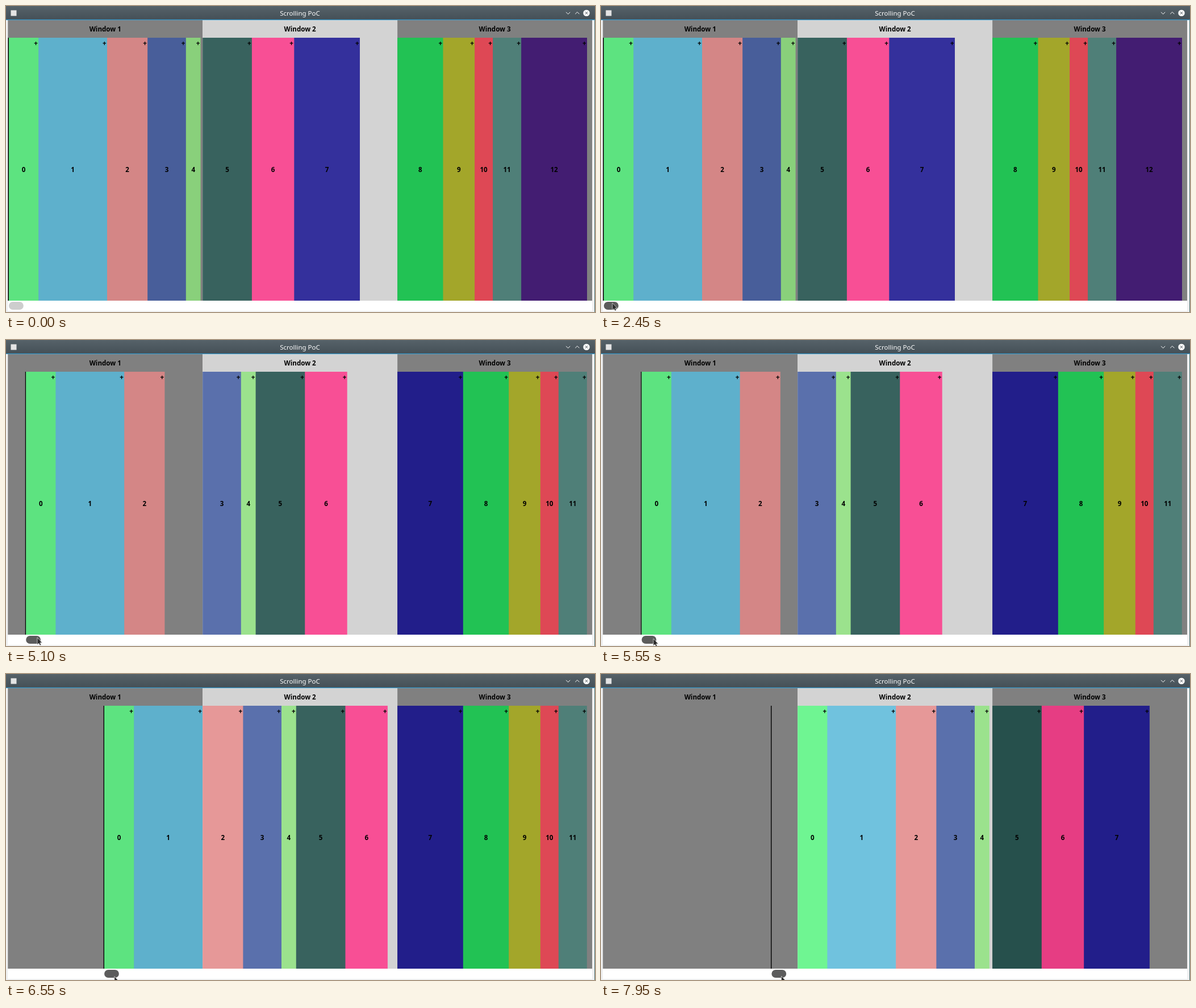
Write an HTML page that moves like this. It is 1037 px wide and 540 px high and loops after 8 s.

```html
<!DOCTYPE html>
<html lang="en">
<head>
<meta charset="utf-8">
<title>Scrolling PoC</title>
<style>
  html, body { margin: 0; width: 100%; height: 100%; overflow: hidden; background: #eff0f1; }
  svg { display: block; }
  text { font: bold 11.6px "Noto Sans", "Open Sans", sans-serif; text-anchor: middle; }
  .title { font-weight: 400; font-size: 11.5px; fill: #fcfcfc; }
  .line { fill: none; stroke: #fcfcfc; stroke-width: 1; }
</style>
</head>
<body>
<svg width="1037" height="540" viewBox="0 0 1037 540">
  <defs>
    <linearGradient id="bar" x2="0" y2="1">
      <stop offset="0" stop-color="#566269"/>
      <stop offset="1" stop-color="#444f56"/>
    </linearGradient>
  </defs>

  <rect width="1037" height="540" fill="#eff0f1"/>
  <rect x="1036" y="25" width="1" height="515" fill="#4a6e70"/>
  <rect width="1037" height="25" fill="url(#bar)"/>
  <rect y="23.8" width="1037" height="1.2" fill="#3b9fd2"/>
  <rect x="8.5" y="7.5" width="10" height="10" fill="#e4e4e4"/>
  <text class="title" x="517.5" y="17">Scrolling PoC</text>
  <path class="line" d="M986 10.8l3.6 3.6 3.6-3.6M1002.2 14.2l3.6-3.6 3.6 3.6"/>
  <circle cx="1022" cy="12.4" r="5.7" fill="#fcfcfc"/>
  <path d="M1019.8 10.2l4.4 4.4m0-4.4l-4.4 4.4" stroke="#475057"/>

  <g id="windows"></g>
  <rect x="3.3" y="520" width="1028.7" height="18" fill="#fff"/>
  <rect id="edge" y="56" width="1.4" height="464"/>
  <g id="columns"></g>
  <rect id="thumb" y="522" width="25.8" height="14" rx="7"/>
  <path id="cursor" d="M0 0V12.6L2.8 10.2 4.8 14 6.8 13 5 9.2H8.6Z" fill="#2b2b2b" stroke="#e8e8e8" stroke-width=".7"/>
</svg>
<script>
const LOOP = 8000, STEP = 50, TOP = 56, HEIGHT = 464;
const EDGES = [3.3, 346.2, 689.1, 1032];
const COLUMNS = [
  [52.2, '#5de380'], [120.8, '#5eb0cc'], [71.2, '#d48686'], [67.6, '#485e9a'],
  [25.8, '#89d07b'], [86.7, '#26504c'], [74.4, '#e63d83'], [115.7, '#221e8a'],
  [80.4, '#22c254'], [55.6, '#a3a62a'], [32, '#de4855'], [50, '#4f7f78'], [115.9, '#431d72']
];

// Each path is a list of [time, value, ...].
const SCROLL = [
  [2450, 5], [3000, 14.2], [4500, 14.2], [5100, 35.2], [5350, 56.3], [5950, 102.2],
  [6200, 125.3], [6950, 219.4], [7050, 223.3], [7900, 294.3], [7950, 300.4]
];
const POINTER = [
  [950, 128, 545], [1000, 125, 532], [1200, 95, 505], [1350, 68, 499], [1550, 34, 510],
  [1700, 17.5, 523], [1750, 20, 524], [2450, 20, 524], [3000, 28, 523.2], [4480, 28, 523.2],
  [5100, 55, 525], [5350, 76, 526], [5950, 124.5, 529], [6200, 147, 530.5],
  [6950, 234.2, 536], [7050, 238.5, 536], [7950, 317.5, 533]
];

const $ = id => document.getElementById(id);

function add(parent, tag, attrs, text = '') {
  const node = document.createElementNS('http://www.w3.org/2000/svg', tag);
  for (const name in attrs) node.setAttribute(name, attrs[name]);
  node.textContent = text;
  return parent.appendChild(node);
}

// Monotone cubic interpolation: smooth, without overshoot.
function follow(path, t, k = 1) {
  const last = path.length - 1;
  if (t <= path[0][0]) return path[0][k];
  if (t >= path[last][0]) return path[last][k];
  const secant = i => (path[i + 1][k] - path[i][k]) / (path[i + 1][0] - path[i][0]);
  const slope = i => {
    if (i === 0) return 0;
    if (i === last) return secant(i - 1);
    const a = secant(i - 1), b = secant(i);
    return a * b > 0 ? 2 * a * b / (a + b) : 0;
  };
  const i = path.findIndex(p => p[0] > t) - 1;
  const [p, q] = [path[i], path[i + 1]];
  const span = q[0] - p[0], u = (t - p[0]) / span, v = 1 - u;
  return v * v * (1 + 2 * u) * p[k] + u * u * (1 + 2 * v) * q[k]
    + span * u * v * (v * slope(i) - u * slope(i + 1));
}

// The middle window shows its columns a little lighter.
function lighten(hex) {
  const parts = hex.match(/\w\w/g).map(h => Math.min(255, parseInt(h, 16) + 18));
  return `rgb(${parts})`;
}

for (let i = 0; i < 3; i++) {
  const x = EDGES[i], width = EDGES[i + 1] - x;
  add($('windows'), 'rect', { x, y: 25, width, height: 495, fill: i === 1 ? '#d3d3d3' : '#808080' });
  add($('windows'), 'text', { x: x + width / 2, y: 45 }, `Window ${i + 1}`);
}

const columns = COLUMNS.map(([width, color], i) => {
  const group = add($('columns'), 'g', {});
  const rect = add(group, 'rect', { y: TOP, height: HEIGHT });
  add(group, 'text', { x: width / 2, y: 293 }, i);
  add(group, 'text', { x: width - 4.6, y: 70 }, '+');
  return { width, group, rect, fills: [color, lighten(color), color] };
});

// Columns fill a window from the left and spill into the next when one does not fit.
function layout(start) {
  let x = start, win = 0;
  const places = columns.map(({ width }) => {
    while (win < 3 && x + width > EDGES[win + 1]) x = EDGES[++win];
    const place = { x, win };
    x += width;
    return place;
  });
  columns.forEach(({ width, group, rect, fills }, i) => {
    const { x, win } = places[i];
    group.setAttribute('visibility', win < 3 ? 'visible' : 'hidden');
    if (win === 3) return;
    const joined = places[i + 1]?.win === win;
    group.setAttribute('transform', `translate(${x})`);
    rect.setAttribute('width', width + (joined ? 0.6 : 0));
    rect.setAttribute('fill', fills[win]);
  });
}

function draw(t) {
  const scroll = follow(SCROLL, t);
  const pressed = (t >= 2050 && t < 3350) || t >= 3900;
  layout(scroll);
  $('edge').setAttribute('x', scroll - 1.4);
  $('thumb').setAttribute('x', scroll);
  $('thumb').setAttribute('fill', pressed ? '#5c5c5c' : '#cdcdcd');
  $('cursor').setAttribute('transform', `translate(${follow(POINTER, t)} ${follow(POINTER, t, 2)})`);
}

const begin = performance.now();
function tick() {
  const t = (performance.now() - begin) % LOOP;
  draw(Math.floor(t / STEP) * STEP);
  requestAnimationFrame(tick);
}
tick();
</script>
</body>
</html>
```
